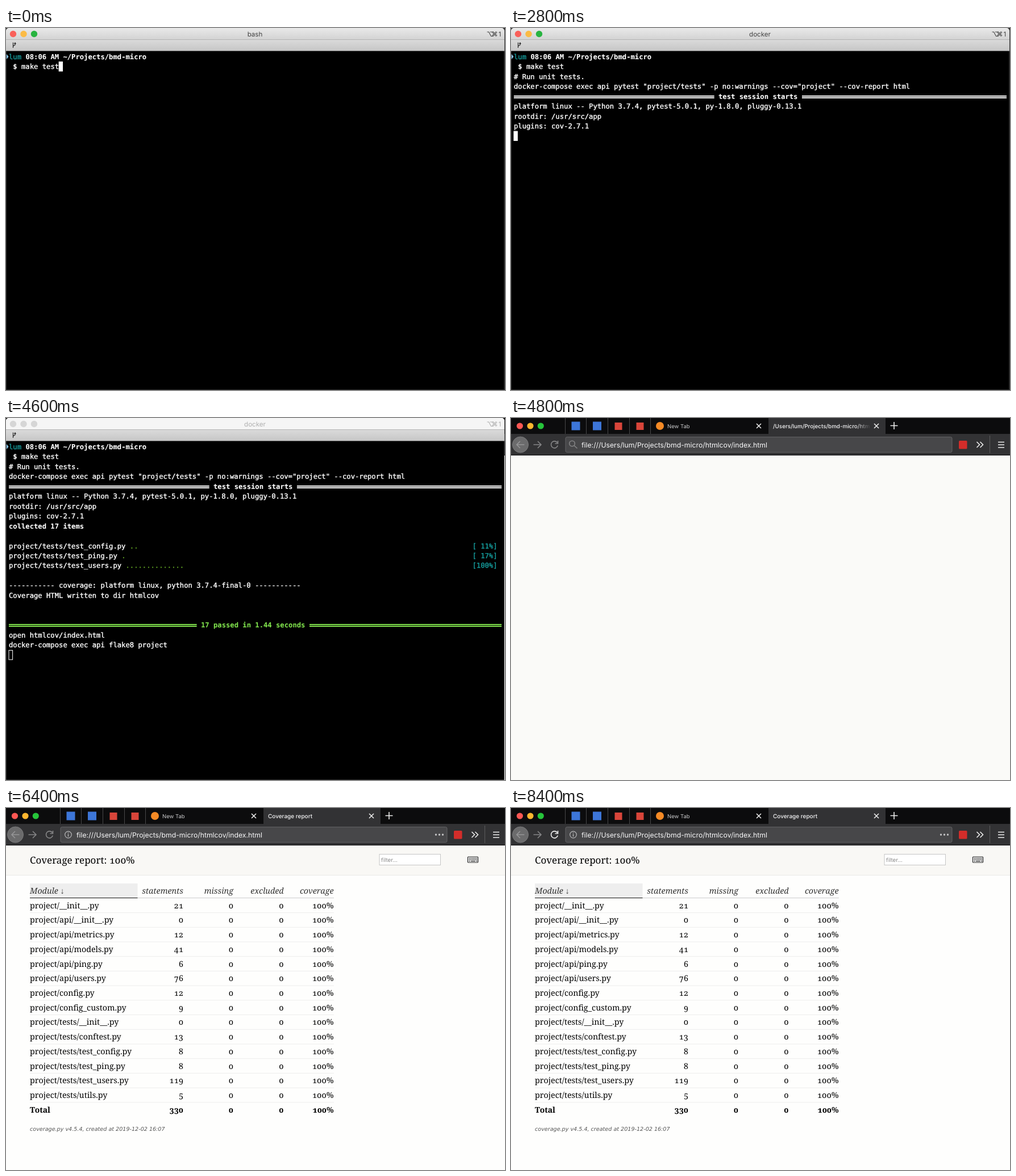
Animation of 878x638 px, one loop 8600 ms. Source, as an HTML page:

```html
<!DOCTYPE html>
<html lang="en">
<head>
<meta charset="utf-8">
<title>Test run</title>
<style>
html, body { margin: 0; width: 100%; height: 100%; overflow: hidden; background: #2a2a2a; }
svg { display: block; width: 878px; height: 638px; }
text { white-space: pre; text-rendering: geometricPrecision; }
.ui { font-family: Inter, sans-serif; }
.line { font: 12.2px "DejaVu Sans Mono", monospace; fill: #fff; stroke: #fff; stroke-width: .4px; }
.bold { font-weight: bold; stroke-width: .1px; }
.cyan { fill: #159c9c; stroke: #159c9c; }
.dots { fill: #5b9a22; stroke: #5b9a22; }
.pass { fill: #7fe04c; stroke: #7fe04c; }
.stroke { fill: none; stroke: #ededed; stroke-width: 1.6; }
.serif { font: 14.3px "Noto Serif", serif; font-variant-numeric: oldstyle-nums; }
.head { font-style: italic; fill: #333; }
.total { font-size: 13.9px; font-weight: bold; }
.end { text-anchor: end; }
.mid { text-anchor: middle; }
</style>
</head>
<body>
<svg viewBox="0 0 878 638">
  <defs>
    <linearGradient id="bar" x2="0" y2="1"><stop stop-color="#e9e9e9"/><stop offset="1" stop-color="#d3d3d3"/></linearGradient>
    <linearGradient id="tabs" x2="0" y2="1"><stop stop-color="#dadada"/><stop offset="1" stop-color="#c6c6c6"/></linearGradient>
    <linearGradient id="fade"><stop offset=".85" stop-color="#323234" stop-opacity="0"/><stop offset="1" stop-color="#323234"/></linearGradient>
    <clipPath id="tabClip"><path d="M455 0h177v28h-177z"/></clipPath>
  </defs>
  <!-- The browser opens behind the terminal window, then comes to the front. -->
  <g id="browser" data-t="4600 8600"></g>
  <g id="terminal" data-t="0 4800"></g>
</svg>
<script>
const LOOP = 8600, CELL = 7.347, ROW = 17.49;
const USER = 'lum';
const during = (from, to = LOOP) => `data-t="${from} ${to}"`;
const colX = col => 5 + col * CELL;
const rowY = row => 54.6 + row * ROW;

// Terminal helpers
const line = (row, body, from = 0, to, col = 0, cls = '') =>
  `<text class="line ${cls}" ${during(from, to)} x="${colX(col)}" y="${rowY(row)}">${body}</text>`;
const span = (cls, body) => `<tspan class="${cls}">${body}</tspan>`;
const cursor = (col, row, from, to) =>
  `<rect ${during(from, to)} x="${colX(col) - .5}" y="${rowY(row) - 13}" width="7.4" height="17.5" fill="#fff"/>`;
const rule = (row, c0, c1, color, from) => [6, 3].map(dy =>
  `<rect ${during(from)} x="${colX(c0)}" y="${Math.round(rowY(row) - dy)}" width="${(c1 - c0) * CELL}" height="2" fill="${color}"/>`).join('');
const lights = (xs, y, r, colors) => xs.map((x, i) =>
  `<circle cx="${x}" cy="${y}" r="${r}" fill="${colors[i]}"/>`).join('');
const title = (name, from, to) =>
  `<text class="ui mid" ${during(from, to)} x="438" y="14.7" font-size="11.6">${name}</text>`;
const testFile = (row, name, dots, percent, from, to) =>
  line(row, `project/tests/${name}.py ${span('dots', '.'.repeat(dots))}`, from, to) +
  (percent ? line(row, `[${percent}%]`, from, to, 111, 'cyan') : '');

const shortcut = `
  <path d="M846.5 7h3l4 7.5h3.5M851.8 7h4.7" fill="none" stroke="currentColor" stroke-width="1.1"/>
  <path transform="translate(854.5 5.3) scale(.43)" fill="none" stroke="currentColor" stroke-width="2.3"
    d="M18 3a3 3 0 0 0-3 3v12a3 3 0 1 0 3-3H6a3 3 0 1 0 3 3V6a3 3 0 1 0-3 3h12a3 3 0 0 0 0-6z"/>
  <text class="ui" x="866.5" y="14.7" font-size="11.6">1</text>`;

const barShape = 'd="M0 20V5a5 5 0 0 1 5-5H872a5 5 0 0 1 5 5V20z"';
const windowBar = `
  <path ${barShape} fill="url(#bar)"/>
  <path ${during(4600)} ${barShape} fill="#f5f5f5"/>
  <rect y="20" width="877" height="1" fill="#b4b4b4"/>
  <rect y="21" width="877" height="19.5" fill="url(#tabs)"/>
  <path d="M12.5 25.5v9.5M12.5 32l3.5-2.3v-3M14.5 28l1.5-2 1.5 2" fill="none" stroke="#222" stroke-width="1.2"/>
  <g ${during(0, 4600)}>${lights([12.5, 31, 49.5], 10.5, 5.7, ['#f9605a', '#fbbb45', '#28b440'])}</g>
  <g ${during(4600)}>${lights([12.5, 31, 49.5], 10.5, 5.7, Array(3).fill('#d6d6d6'))}</g>
  <g fill="#434343" color="#434343" ${during(0, 4600)}>
    ${title('bash', 0, 1000)}${title('make', 1000, 1200)}${title('docker-compose', 1200, 2000)}${title('docker', 2000)}
    ${shortcut}
  </g>
  <g fill="#b0b0b0" color="#b0b0b0" ${during(4600)}>${title('docker', 0)}${shortcut}</g>`;

terminal.innerHTML = `
  <path d="M.5 40V637.5H876.5V40" fill="#000" stroke="#2a2a2a"/>
  ${windowBar}
  <path d="M1 46l3.5 4.5L1 55z" fill="#8cc8ee"/>` +
  line(0, USER, 0, LOOP, 0, 'cyan') +
  line(0, '08:06 AM ~/Projects/bmd-micro', 0, LOOP, 4, 'bold') +
  line(1, ` ${span('bold', '$')} make test`) +
  line(2, '# Run unit tests.', 400) +
  line(3, 'docker-compose exec api pytest "project/tests" -p no:warnings --cov="project" --cov-report html', 400) +
  rule(4, 0, 48, '#fff', 2800) + rule(4, 69, 118, '#fff', 2800) +
  line(4, 'test session starts', 2800, LOOP, 49, 'bold') +
  line(5, 'platform linux -- Python 3.7.4, pytest-5.0.1, py-1.8.0, pluggy-0.13.1', 2800) +
  line(6, 'rootdir: /usr/src/app', 2800) +
  line(7, 'plugins: cov-2.7.1', 2800) +
  line(8, 'collected 17 items', 3000, LOOP, 0, 'bold') +
  testFile(10, 'test_config', 2, ' 11', 3200) +
  testFile(11, 'test_ping', 1, ' 17', 3200) +
  testFile(12, 'test_users', 4, '', 3400, 3600) +
  testFile(12, 'test_users', 10, '', 3600, 3800) +
  testFile(12, 'test_users', 14, '100', 3800) +
  line(14, '----------- coverage: platform linux, python 3.7.4-final-0 -----------', 4200) +
  line(15, 'Coverage HTML written to dir htmlcov', 4200) +
  rule(18, 0, 45, '#7fe04c', 4200) + rule(18, 72, 118, '#7fe04c', 4200) +
  line(18, '17 passed in 1.44 seconds', 4200, LOOP, 46, 'bold pass') +
  line(19, 'open htmlcov/index.html', 4200) +
  line(20, 'docker-compose exec api flake8 project', 4400) +
  [[12, 1, 0], [0, 4, 400], [0, 8, 2800], [0, 10, 3000], [0, 12, 3200], [32, 12, 3400],
   [38, 12, 3600], [117, 12, 3800], [0, 20, 4200], [0, 21, 4400], [0, 0, 4600]]
    .map(([c, r, from], i, all) => all[i + 1] ? cursor(c, r, from, all[i + 1][2]) : '').join('') +
  `<rect ${during(4600)} x="5" y="${rowY(21) - 12.5}" width="6.6" height="16.5" fill="none" stroke="#fff"/>`;

// Browser
const LOADED = 5400, READY = 6600;
const ui = (x, y, size, fill, body, extra = '') =>
  `<text class="ui" x="${x}" y="${y}" font-size="${size}" fill="${fill}" ${extra}>${body}</text>`;
const icon = (d, extra = '') => `<path class="stroke" d="${d}" ${extra}/>`;
const cross = x => icon(`M${x - 4} 10l8 8m0-8l-8 8`);
const reload = 'M81.5 43.5a6 6 0 1 0 .8 5M82.5 40v5h-5';
const dim = 'style="stroke:#858586"';

const chrome = `
  <rect width="878" height="28" fill="#0c0c0d"/>
  <path d="M453 0h206v28h219v38H0V28h453z" fill="#323234"/>
  <rect y="65" width="878" height="1" fill="#0c0c0d"/>
  ${lights([15.5, 34, 52.3], 14, 5.6, ['#fc5753', '#fdb62f', '#26c53a'])}
  <path d="M95.5 0v28M132.5 0v28M170.5 0v28M208.5 0v28M245.5 0v28" stroke="#474748"/>
  <path d="M106.5 6.5h15v15h-15zm37.5 0h15v15h-15z" fill="#3d76d8"/>
  <path d="M182.5 8h13v13h-13zm38 0h13v13h-13z" fill="#d8453a"/>
  <circle cx="262" cy="14" r="7" fill="#f58a25"/>
  ${ui(275, 17.5, 9.5, '#c9c9ca', 'New Tab')}
  ${cross(436)}${cross(643)}${icon('M667.5 13.5h13m-6.5-6.5v13')}
  <g ${during(0, LOADED)}>
    ${ui(461, 17.5, 9.8, '#f4f4f5', `/Users/${USER}/Projects/bmd-micro/htmlcov`, 'clip-path="url(#tabClip)" font-weight="500"')}
    <rect x="455" y="4" width="178" height="20" fill="url(#fade)"/>
  </g>
  ${ui(461, 17.5, 10, '#f4f4f5', 'Coverage report', `font-weight="500" ${during(LOADED)}`)}
  <circle cx="16.5" cy="47" r="14" fill="#6b6b6c" stroke="#79797a"/>
  ${icon('M23.5 47h-13.5m6-6l-6 6 6 6', 'style="stroke:#969697"')}
  ${icon('M39.5 47h13.5m-6-6l6 6-6 6', dim)}
  ${icon(reload, `${dim} ${during(0, READY)}`)}${icon(reload, during(READY))}
  <rect x="96" y="33.5" width="680" height="27" rx="2.5" fill="#474749" stroke="#626264"/>
  <g ${during(0, LOADED)}>
    <circle class="stroke" cx="107.5" cy="45" r="4.8" ${dim}/>${icon('M111 48.5l5.5 5', dim)}
  </g>
  <g ${during(LOADED)}>
    <circle cx="109.5" cy="47" r="5.8" fill="none" stroke="#b8b8b9" stroke-width="1.2"/>
    <path d="M109.5 46v4.5M109.5 43.3v1.4" stroke="#b8b8b9" stroke-width="1.4"/>
    ${lights([756.5, 762.5, 768.5], 47, 1.7, Array(3).fill('#c4c4c5'))}
  </g>
  ${ui(124, 52, 12.25, '#f9f9fa', `file:///Users/${USER}/Projects/bmd-micro/htmlcov/index.html`)}
  <rect x="788" y="40" width="14.5" height="14.5" rx="1.5" fill="#d32d2a"/>
  ${icon('M819.5 42l5 5-5 5m6-10l5 5-5 5')}
  <path d="M842.5 31v31" stroke="#5b5b5c"/>
  ${icon('M857 42.5h11M857 47.2h11M857 52h11')}`;

const columns = [312, 400, 488.5, 576.5];
const serif = (x, y, body, cls = '') => `<text class="serif ${cls}" x="${x}" y="${y}">${body}</text>`;
const tableRow = (y, cells, cls) => serif(42, y, cells[0], cls) +
  columns.map((x, i) => serif(x, y, cells[i + 1], `${cls} end`)).join('');
const modules = {
  '__init__': 21, 'api/__init__': 0, 'api/metrics': 12, 'api/models': 41, 'api/ping': 6, 'api/users': 76,
  'config': 12, 'config_custom': 9, 'tests/__init__': 0, 'tests/conftest': 13, 'tests/test_config': 8,
  'tests/test_ping': 8, 'tests/test_users': 119, 'tests/utils': 5
};
const tableY = i => 176.7 + i * 25.72;

const report = `
  <rect y="66" width="878" height="572" fill="#fefefd"/>
  <rect y="66" width="878" height="52" fill="#f9f8f5"/>
  <rect y="118" width="878" height="1" fill="#ebebe8"/>
  <text class="serif" x="42" y="98" style="font-size:17px">Coverage report: 100%</text>
  <rect x="657" y="81.5" width="107.5" height="19" fill="#fff" stroke="#c6c6c6"/>
  ${ui(660, 94.7, 9.8, '#8a8a8a', 'filter...')}
  <rect x="812.5" y="86" width="18" height="10" rx="1" fill="#fff" stroke="#222" stroke-width="1.2"/>
  <path d="M814.5 88.5h14.5M814.5 91h14.5" stroke="#222" stroke-width="1.3" stroke-dasharray="1.4 .8"/>
  <path d="M814.5 93.7h2m1.3 0h8m1.3 0h2" stroke="#222" stroke-width="1.2"/>
  <rect x="42" y="133" width="189.5" height="25" fill="#eee"/>
  <path d="M231 158.5h346" stroke="#ccc"/>
  <path d="M42 158.5h189.5" stroke="#111"/>
  ${tableRow(151, ['Module ↓', 'statements', 'missing', 'excluded', 'coverage'], 'head')}
  ${Object.entries(modules).map(([name, n], i) =>
    tableRow(tableY(i), [`project/${name}.py`, n, 0, 0, '100%'], '') +
    `<rect x="42" y="${tableY(i) + 7.3}" width="535" height="1" fill="#ededed"/>`).join('')}
  ${tableRow(tableY(14), ['Total', 330, 0, 0, '100%'], 'total')}
  <text x="42" y="569" fill="#555" style="font:italic 9.6px 'DejaVu Sans',sans-serif">coverage.py v4.5.4, created at 2019-12-02 16:07</text>`;

browser.innerHTML = `
  <rect width="878" height="638" fill="#fafaf8"/>
  ${chrome}
  <g ${during(LOADED)}>${report}</g>`;

const timed = [...document.querySelectorAll('[data-t]')].map(el => [el, ...el.dataset.t.split(' ').map(Number)]);
const start = performance.now();
function draw() {
  const t = (performance.now() - start) % LOOP;
  for (const [el, from, to] of timed) el.style.display = t >= from && t < to ? '' : 'none';
  requestAnimationFrame(draw);
}
draw();
</script>
</body>
</html>
```
